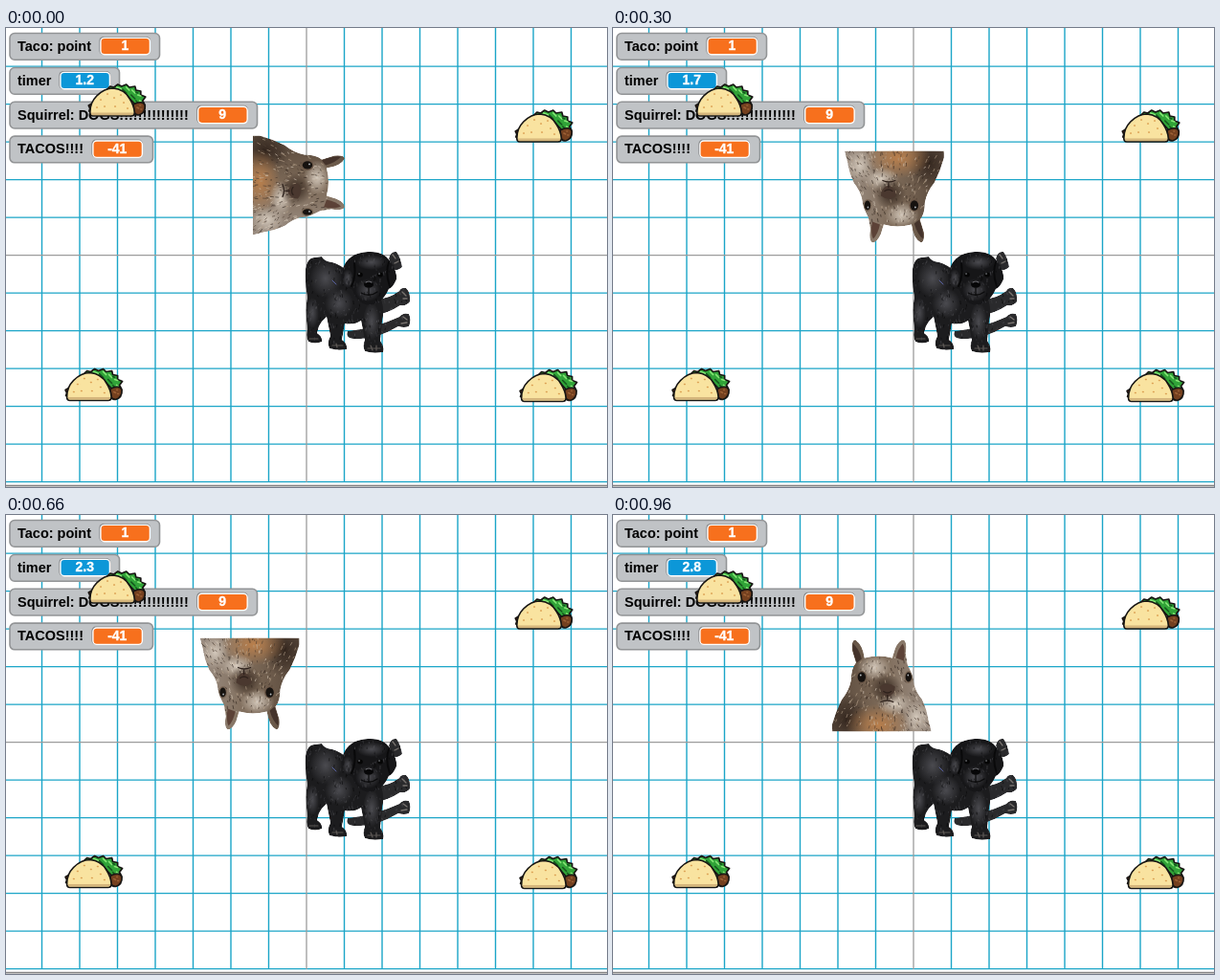
An HTML page that plays this animation: 628 by 480 pixels, repeating every 980 ms.

```html
<!DOCTYPE html>
<html lang="en">
<head>
<meta charset="utf-8">
<title>Taco chase</title>
<style>
html, body { margin: 0; width: 100%; height: 100%; overflow: hidden; background: #fff; }
svg { display: block; width: 628px; height: 480px; }
text { font: bold 14.5px "Liberation Sans", Arial, sans-serif; }
.value { font-size: 14px; fill: #fff; stroke: #fff; stroke-width: 0.35px; text-anchor: middle; }
</style>
</head>
<body>
<svg id="stage" viewBox="0 0 628 480" xmlns="http://www.w3.org/2000/svg"></svg>
<script>
const LOOP = 980, FRAME = 20, STEP = 13.1, CELL = 39.5;
const ORANGE = '#f7701d', BLUE = '#0c97d8';

let seed = 7;
const rand = () => (seed = (seed * 16807) % 2147483647) / 2147483647;

const path = (d, fill, extra = '') => `<path d="${d}" fill="${fill}" ${extra}/>`;
const oval = (x, y, rx, ry, fill) =>
  `<ellipse cx="${x}" cy="${y}" rx="${rx}" ry="${ry}" fill="${fill}"/>`;
const line = (d, color, width) =>
  path(d, 'none', `stroke="${color}" stroke-width="${width}" stroke-linecap="round"`);
const clip = (id, d) => `<clipPath id="${id}"><path d="${d}"/></clipPath>`;
const glow = (id, color) => `<radialGradient id="${id}"><stop offset="0" stop-color="${color}"/>
  <stop offset="1" stop-color="${color}" stop-opacity="0"/></radialGradient>`;

function grid() {
  const x0 = 314, y0 = 237.6;
  let blue = '';
  for (let i = -7; i <= 7; i++) if (i) blue += `M${x0 + i * CELL} 0V475`;
  for (let i = -5; i <= 6; i++) if (i) blue += `M0 ${y0 + i * CELL}H628`;
  return path(blue, 'none', 'stroke="#1ba5c8" stroke-width="1.4"') +
    path(`M${x0} 0V475M0 ${y0}H628`, 'none', 'stroke="#9c9c9c" stroke-width="1.3"') +
    path('M0 478.6H628', 'none', 'stroke="#858585" stroke-width="1.6"');
}

function monitor(y, width, label, boxX, value, color, id = '') {
  return `<g transform="translate(0 ${y})">
    <rect x="4" y="0.5" width="${width}" height="27.7" rx="5" fill="#c0c3c6" stroke="#929496" stroke-width="1.6"/>
    <text x="12" y="18.8">${label}</text>
    <rect x="${boxX - 0.6}" y="4" width="53.6" height="19" rx="4.5" fill="#85888a"/>
    <rect x="${boxX + 0.9}" y="5.4" width="51.5" height="17.4" rx="4" fill="${color}" stroke="#fff" stroke-width="1.4"/>
    <text class="value" id="${id}" x="${boxX + 26.3}" y="18.4">${value}</text></g>`;
}

function fur(count, x, y, w, h, colors, lean, opacity) {
  let out = '';
  for (let i = 0; i < count; i++) {
    const px = x + rand() * w, py = y + rand() * h;
    const dx = (rand() - 0.5) * 2 + px * lean, dy = 1 + rand() * 3;
    const c = colors[Math.floor(rand() * colors.length)];
    out += `<path d="M${px.toFixed(1)} ${py.toFixed(1)}l${dx.toFixed(1)} ${dy.toFixed(1)}" stroke="${c}"/>`;
  }
  return `<g stroke-width="1" opacity="${opacity}">${out}</g>`;
}

function taco() {
  const ink = 'stroke="#171513" stroke-width="1.7" stroke-linejoin="round"';
  return path('M19 7L23 3L27 4L31 1L35 3L40 1L43 4L49 3L50 7L55 8L55 12L60 14L57 18L59 22L51 24L40 12Z', '#31a338', ink) +
    line('M30 4l5 2M40 4l3 3M46 7l3 3M52 12l3 1M54 18l2 2', '#86e676', 1.7) +
    line('M36 6l4 4M45 12l4 4M50 9l2 1M50 18l2 2', '#14571d', 1.6) +
    path('M47 22Q57 17 59.500 23Q60 31 53 33Q46 33 47 22Z', '#74401f', ink) +
    line('M51 25l2 1M55 27l1 0M54 23l1 0', '#9d6136', 1.4) +
    path('M4 21L0.500 23L2 26L1 29L5 30Z', '#9c3328', ink) +
    path('M2 30Q2 20 9 13Q17 5 26 5Q38 6 43.500 16Q48 23 48.500 30Q48.500 34 45 34H5Q2 34 2 30Z', '#f9e3a0', ink) +
    path('M3 30.500H47.500Q47.500 33 45 33H5Q3 33 3 30.500Z', '#d5b67c') +
    line('M13 17h.5M20 11h.5M27 15h.5M34 12h.5M17 24h.5M28 24h.5M37 20h.5M41 26h.5M9 25h.5', '#dca154', 1.7);
}

function squirrel() {
  const body = 'M-52 49V42Q-48 28 -42 16Q-34 6 -32 -5Q-32 -17 -27 -23L-31 -36Q-32 -46 -28 -47' +
    'Q-20 -43 -18 -28Q-3 -32 11 -28L14 -38Q18 -47 23 -47Q27 -44 25 -33L27 -21Q33 -10 34 0' +
    'Q36 8 42 15Q47 25 49 38L52 49Z';
  return clip('pelt', body) + glow('chest', '#b97f4c') + glow('cheek', '#d3c8bb') + glow('shade', '#33261e') +
    `<linearGradient id="base" x1="0" x2="1">
      <stop offset="0" stop-color="#57473a"/><stop offset="0.5" stop-color="#7d6a58"/>
      <stop offset="1" stop-color="#9c8f84"/></linearGradient>
    <g clip-path="url(#pelt)">` +
    path(body, 'url(#base)') +
    oval(-36, 36, 22, 28, 'url(#shade)') + oval(-4, 42, 34, 22, 'url(#chest)') +
    oval(14, 20, 19, 12, 'url(#cheek)') + oval(36, 34, 14, 18, 'url(#cheek)') +
    oval(-8, -18, 18, 14, 'url(#cheek)') + oval(4, 4, 17, 17, 'url(#shade)') +
    fur(420, -52, -32, 104, 82, ['#2d221b', '#4c3d32', '#b9a48c', '#dccfbf'], 0.04, 0.6) +
    path('M-30 -43Q-24 -38 -21 -27L-26 -23Q-31 -35 -30 -43Z', '#44332b') +
    path('M22 -43Q17 -38 15 -28L23 -25Q25 -38 22 -43Z', '#5c4237') +
    oval(-21, -8, 5.5, 6.5, '#6b5747') + oval(28, -8, 4.5, 6.5, '#7b6857') +
    oval(-21, -8, 4.2, 5.2, '#16120f') + oval(28, -8, 3.2, 5, '#16120f') +
    oval(-22, -10, 0.9, 0.9, '#b9bec2') + oval(27.5, -10, 0.8, 0.9, '#b9bec2') +
    path('M-2 2Q6 -4 14 2Q14 10 6 13Q-1 10 -2 2Z', '#4a382f') +
    line('M2 7Q6 10 10 7M6 11V15M-1 18Q6 15 12 18', '#2e221c', 1.3) + '</g>';
}

function dog() {
  const body = 'M313 252Q315 240 322 240L330 239Q332 244 341 245Q352 248 360 258L388 276Q397 290 393 307' +
    'L391 327Q396 333 394 339Q383 341 375 338Q372 333 375 326L371 306Q364 311 354 309' +
    'L351 326Q357 330 356 336Q347 338 338 335Q335 329 339 322L335 302Q330 306 327 312' +
    'L325 319Q331 323 330 328Q323 331 316 328Q313 323 315 315Q312 293 315 282Q312 268 313 252Z';
  const head = 'M352 251Q358 235 378 234Q394 233 401 243Q409 254 408 263Q404 272 400 273' +
    'Q393 289 379 290Q366 288 362 274L354 270Q348 262 352 251Z';
  const legs = 'M380 283Q396 286 411 275Q413 271 418 272Q423 276 422 286Q419 291 412 290Q400 298 384 301Z' +
    'M357 317Q385 314 411 302Q415 297 421 299Q424 305 421 312Q416 314 410 312Q385 327 363 325Q354 324 357 317Z' +
    'M400 241Q402 233 408 234Q412 239 414 250Q409 255 404 252Z';
  const hairs = ['#070708', '#3c3c40', '#5b5b60'];
  return clip('coat', body + legs) + clip('crown', head) + glow('sheen', '#4b4b50') +
    '<g clip-path="url(#coat)">' +
    path(legs, '#2a2a2c') + path(body, '#1c1c1e') +
    oval(334, 262, 17, 20, 'url(#sheen)') + oval(348, 288, 15, 16, 'url(#sheen)') +
    oval(382, 307, 9, 20, 'url(#sheen)') + oval(320, 298, 7, 16, 'url(#sheen)') +
    fur(420, 312, 236, 112, 104, hairs, 0, 0.55) + '</g>' +
    line('M404 237l3 4M406 246l4-2M414 276l4 4M415 283l4 0M415 302l4 3M413 309l6-1', '#77726e', 1.3) +
    '<g clip-path="url(#crown)">' + path(head, '#161618') +
    oval(382, 245, 16, 8, 'url(#sheen)') + oval(378, 274, 13, 12, 'url(#sheen)') +
    oval(357, 262, 6, 10, 'url(#sheen)') +
    fur(110, 350, 234, 60, 56, hairs, 0, 0.5) +
    line('M364 246Q366 260 361 270M400 245Q396 256 401 270', '#09090a', 2) +
    oval(379, 268, 5, 3.8, '#060607') +
    oval(370, 258, 2.8, 2.5, '#050505') + oval(391, 258, 2.8, 2.5, '#050505') +
    line('M369 257h.1M390 257h.1', '#a3a7ad', 1.3) +
    line('M371 277Q380 282 388 276M379 272V279', '#0b0b0c', 1.3) +
    line('M376 266q3-2 6 0', '#707076', 1.2) + '</g>' +
    line('M317 325h9M341 332h11M378 335h13M381 332l2 5M387 332v5M345 330l1 4', '#5d5855', 1.2) +
    line('M341 264l4 4', '#5760a0', 1);
}

const tacoSpots = [[85.8, 58], [531.8, 85], [61.6, 355.5], [536.6, 356.5]];

document.getElementById('stage').innerHTML =
  '<rect width="628" height="480" fill="#fff"/>' + grid() +
  monitor(5, 156.5, 'Taco: point', 98, '1', ORANGE) +
  monitor(41, 114.5, 'timer', 56, '1.2', BLUE, 'clock') +
  monitor(76.8, 258.5, 'Squirrel: DOGS' + '!'.repeat(15), 199.8, '9', ORANGE) +
  monitor(112.6, 149.5, 'TACOS!!!!', 90, '-41', ORANGE) +
  `<g id="squirrel">${squirrel()}</g>` + dog() +
  tacoSpots.map(([x, y]) => `<g transform="translate(${x} ${y})">${taco()}</g>`).join('');

const hero = document.getElementById('squirrel');
const clock = document.getElementById('clock');

// Each move: time, x steps, y steps, heading in degrees.
const moves = [
  [100, 0, 1, 90],
  [260, -1, 0, 180], [360, -1, 0, 180], [460, -1, 0, 180], [560, -1, 0, 180],
  [680, 1, 0, 0], [860, 1, 0, 0]
];

function draw(ms) {
  const t = Math.floor((ms % LOOP) / FRAME) * FRAME;
  let x = 307, y = 164.4, turn = 90;
  for (const [at, dx, dy, heading] of moves) {
    if (t < at) break;
    x += dx * STEP;
    y += dy * STEP;
    turn = heading;
  }
  hero.setAttribute('transform', `translate(${x} ${y}) rotate(${turn})`);
  clock.textContent = (1.2 + t / 600).toFixed(1);
}

const start = performance.now();
function tick() {
  draw(performance.now() - start);
  requestAnimationFrame(tick);
}
tick();
</script>
</body>
</html>
```
